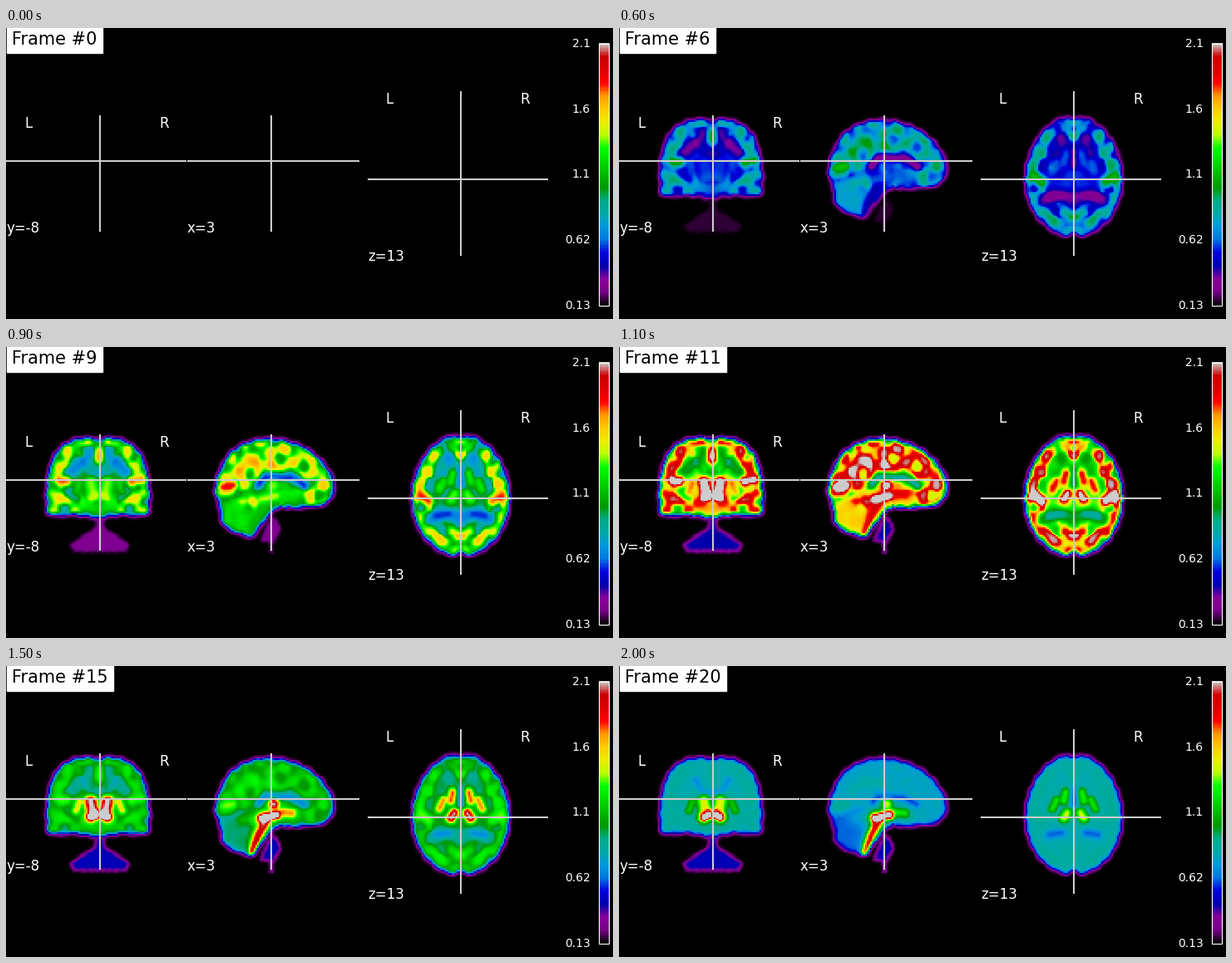
A matplotlib script that plays this animation: 730x350 px, repeating every 2.1 s.

```python
import numpy as np
import matplotlib.pyplot as plt
from matplotlib.animation import FuncAnimation
from matplotlib.path import Path
from matplotlib.patches import Rectangle

W, H, DPI = 730, 350, 100
FRAMES, STEP = 21, 100
CELL = 1.86
CMAP = "nipy_spectral"
PEAK_TIME, WASHOUT = 11.3, 4

# peak level, resting level, steepness of the rise, start of the washout
TISSUES = {
    "grey": (.93, .30, 1.5, PEAK_TIME),
    "medial": (.93, .24, 1.5, PEAK_TIME),
    "white": (.45, .33, 2.4, PEAK_TIME),
    "mixed": (.78, .34, 2.2, PEAK_TIME),
    "csf": (.34, .16, 2.6, PEAK_TIME),
    "hot": (1.18, .28, 1.3, PEAK_TIME),
    "cereb": (.75, .17, 1.35, PEAK_TIME),
    "deep": (1.15, .56, 2.6, 14),
    "striatum": (.97, .50, 2.2, 14),
    "pons": (1.0, .90, 3, 14),
    "stem": (1.16, 1.1, 2.5, 14),
    "neck": (.168, .168, 3.2, 14),
}


def uptake(tissue, n):
    peak, rest, power, hold = TISSUES[tissue]
    if n < PEAK_TIME:
        return peak * (n / PEAK_TIME) ** power
    return rest + (peak - rest) * np.exp(-max(0, n - hold) / WASHOUT)


def sigmoid(v):
    return 1 / (1 + np.exp(-v))


def mirror(pts, axis):
    return [(2 * axis - x, y) for x, y in pts]


def symmetric(half, axis):
    return half + mirror(half[-2:0:-1], axis)


def spline(pts, steps=6):
    """Closed Catmull-Rom curve through the points."""
    p = np.array(pts, float)
    a, b, c, d = (np.roll(p, k, axis=0)[:, None] for k in (1, 0, -1, -2))
    t = (np.arange(steps) / steps)[None, :, None]
    curve = b + .5 * t * (c - a + t * (2 * a - 5 * b + 4 * c - d
                                       + t * (3 * (b - c) + d - a)))
    return curve.reshape(-1, 2)


def line_dist(X, Y, pts):
    d = np.full(X.shape, np.inf)
    ends = pts[1:] if len(pts) > 1 else pts
    for (ax, ay), (bx, by) in zip(pts, ends):
        ux, uy = bx - ax, by - ay
        t = ((X - ax) * ux + (Y - ay) * uy) / (ux * ux + uy * uy + 1e-9)
        t = np.clip(t, 0, 1)
        d = np.minimum(d, np.hypot(X - ax - t * ux, Y - ay - t * uy))
    return d


class Slice:
    """One section through the head, as a weighted mix of tissues."""

    def __init__(self, ax, box, outline, base, seed, axis=None, neck=None):
        x0, x1, y0, y1 = box
        nx, ny = round((x1 - x0) / CELL), round((y1 - y0) / CELL)
        xs = x0 + (np.arange(nx) + .5) * (x1 - x0) / nx
        ys = y0 + (np.arange(ny) + .5) * (y1 - y0) / ny
        self.X, self.Y = np.meshgrid(xs, ys)
        self.axis = axis
        depth = self.depth(outline)
        self.brain = self.edge(depth)
        self.neck = self.edge(self.depth(neck)) if neck else 0
        self.mix = {base: np.ones(self.X.shape)}

        folds = self.folds(seed)
        self.over("white", .5 * sigmoid(2.2 * (folds - .7)))
        self.over("hot", .4 * sigmoid(-2.5 * (folds + .8)))
        if axis:
            self.over("white", .6 * sigmoid((depth - 19 + 5 * folds) / 2))
        self.img = ax.imshow(np.zeros((ny, nx)), cmap=CMAP, vmin=0, vmax=1,
                             extent=(x0, x1, y1, y0), aspect="auto",
                             interpolation="nearest", zorder=1)

    def depth(self, pts):
        p = spline(pts)
        d = line_dist(self.X, self.Y, np.vstack([p, p[:1]]))
        xy = np.column_stack([self.X.ravel(), self.Y.ravel()])
        inside = Path(p).contains_points(xy).reshape(d.shape)
        cx, cy = p.mean(axis=0)
        turn = np.arctan2(self.Y - cy, self.X - cx)
        return np.where(inside, d, -d) + .6 * np.sin(23 * turn)

    @staticmethod
    def edge(depth):
        return sigmoid((depth - 3.8) / 1.45)

    def folds(self, seed):
        """Seeded waves, nearly alike on both sides of the axis."""
        rng = np.random.default_rng(seed)
        X = self.X
        if self.axis:
            X = np.abs(X - self.axis) + .06 * (X - self.axis)
        f = np.zeros(X.shape)
        for a in np.arange(7) * np.pi / 7 + rng.uniform(0, .4, 7):
            k = 2 * np.pi / rng.uniform(15, 26)
            f += np.sin(k * (X * np.cos(a) + self.Y * np.sin(a))
                        + rng.uniform(0, 2 * np.pi))
        return f / f.std()

    def over(self, tissue, m):
        for k in self.mix:
            self.mix[k] = self.mix[k] * (1 - m)
        self.mix[tissue] = self.mix.get(tissue, 0) + m

    def paint(self, tissue, pts, r, strength=1, soft=1.6):
        d = line_dist(self.X, self.Y, pts)
        if self.axis:
            d = np.minimum(d, line_dist(self.X, self.Y,
                                        mirror(pts, self.axis)))
        self.over(tissue, strength * sigmoid((r - d) / soft))

    def show(self, n):
        v = sum(m * uptake(k, n) for k, m in self.mix.items()) * self.brain
        self.img.set_data(np.maximum(v, self.neck * uptake("neck", n)))
        return self.img


def make_coronal(ax):
    half = [(111, 109), (122, 107), (145, 111), (163, 126), (172, 150),
            (175, 186), (169, 204), (140, 204), (111, 208)]
    neck = [(113, 202), (124, 204), (121, 214), (133, 223), (150, 236),
            (144, 248), (113, 249)]
    s = Slice(ax, (40, 184, 100, 256), symmetric(half, 110.5), "grey", 4,
              112, symmetric(neck, 113))
    s.paint("mixed", [(112, 172), (112, 201)], 19, .7, 3)
    s.paint("white", [(103, 126), (92, 138), (79, 150)], 6, .9, 2)
    s.paint("csf", [(92, 137), (101, 152), (112, 152)], 2.5, .5)
    s.paint("hot", [(63, 160), (73, 161)], 5, .9)
    s.paint("hot", [(112, 126), (112, 135)], 5, .7)
    s.paint("striatum", [(88, 164), (84, 174)], 4, .7)
    s.paint("deep", [(102, 163), (105, 177)], 7)
    s.paint("stem", [(102, 182), (108, 179)], 5)
    return s


def make_sagittal(ax):
    outline = [(249, 168), (263, 132), (288, 113), (320, 108), (352, 115),
               (380, 134), (397, 164), (386, 190), (345, 196), (327, 196),
               (308, 217), (295, 231), (261, 217), (254, 190)]
    neck = [(319, 200), (333, 218), (324, 238), (323, 249), (315, 249),
            (314, 238), (304, 232)]
    s = Slice(ax, (244, 404, 100, 256), outline, "medial", 11, None, neck)
    s.paint("cereb", [(268, 199), (284, 212)], 19, .9, 2.5)
    s.paint("csf", [(264, 183), (298, 170)], 2.5, .4, 2)
    s.paint("mixed", [(308, 172), (316, 188), (303, 212)], 10, .95, 2.5)
    s.paint("mixed", [(330, 170), (346, 182)], 9, .8, 2.5)
    s.paint("white", [(303, 166), (312, 156), (348, 156), (360, 167)], 5)
    s.paint("csf", [(305, 164), (312, 157), (342, 158), (358, 166)], 3.5, .8)
    s.paint("hot", [(260, 168), (273, 166)], 5)
    s.paint("hot", [(280, 147), (300, 140), (320, 140)], 5, .55, 2)
    s.paint("pons", [(312, 186), (303, 205), (297, 224)], 5)
    s.paint("deep", [(322, 166)], 5.5)
    s.paint("striatum", [(334, 176), (344, 177)], 4, .9)
    s.paint("stem", [(307, 183), (325, 179)], 5)
    return s


def make_axial(ax):
    t = np.arange(48) * np.pi / 24
    notch = 4 * np.exp(-(np.cos(t) / .1) ** 2)
    outline = np.column_stack([
        547 + 61 * np.cos(t) * (1 + .04 * np.sin(t)),
        178.5 + (75.5 - notch) * np.sin(t)])
    s = Slice(ax, (480, 614, 96, 260), outline, "grey", 23, 547)
    s.paint("white", [(527, 119), (533, 137), (530, 150)], 5.5, .8, 2)
    s.paint("white", [(511, 205), (528, 202), (547, 203)], 7, .95, 2)
    s.paint("csf", [(518, 203), (532, 201)], 4, .7)
    s.paint("csf", [(547, 150), (547, 166)], 2.5, .9)
    s.paint("hot", [(496, 177), (508, 185)], 6, .9)
    s.paint("hot", [(536, 222), (547, 227)], 5, .6)
    s.paint("striatum", [(537, 152), (535, 162)], 4)
    s.paint("striatum", [(526, 161), (521, 172)], 3.5, .95)
    s.paint("deep", [(535, 183), (539, 177)], 5)
    return s


def label(x, y, text, size=12, **kw):
    ax.text(x, y, text, size=size, color="white", zorder=5, **kw)


def cross(x, y, left, right, top, bottom):
    style = dict(color=".8", lw=1.5, solid_capstyle="butt", zorder=3)
    ax.plot([left, right], [y, y], **style)
    ax.plot([x, x], [top, bottom], **style)


plt.rcParams["font.family"] = "DejaVu Sans"
fig = plt.figure(figsize=(W / DPI, H / DPI), dpi=DPI, facecolor="black")
ax = fig.add_axes([0, 0, 1, 1])
ax.axis("off")

slices = [make_coronal(ax), make_sagittal(ax), make_axial(ax)]

cross(113, 160, 0, 217, 105, 245)
cross(319, 160, 218, 425, 105, 245)
cross(547, 182, 435, 652, 76, 274)

for left, base in ((0, 120), (434.3, 91)):
    label(left + 22.3, base, "L")
    label(left + 195.7, base, "R", ha="right")
label(0.5, 246.5, "y=-8")
label(217.5, 246.5, "x=3")
label(435.3, 280.5, "z=13")

# Colour bar
ax.imshow(np.linspace(0, 1, 256)[::-1, None], cmap=CMAP, vmin=0, vmax=1,
          extent=(713, 726, 334, 18), aspect="auto",
          interpolation="nearest", zorder=1)
ax.add_patch(Rectangle((713, 19), 12, 315, fill=False, ec="white", lw=.8,
                       zorder=2))
for i, tick in enumerate(("2.1", "1.6", "1.1", "0.62", "0.13")):
    label(703, 23.3 + 78.58 * i, tick, 10, ha="right")

title = ax.text(7.3, 3.5, "", size=15, va="top", color="black", zorder=6,
                bbox=dict(boxstyle="square,pad=0.3", fc="white", ec="white"))
ax.set_xlim(0, W)
ax.set_ylim(H, 0)


def draw(n):
    title.set_text(f"Frame #{n}")
    return [s.show(n) for s in slices] + [title]


anim = FuncAnimation(fig, draw, frames=FRAMES, interval=STEP, repeat=True)
plt.show()
```
